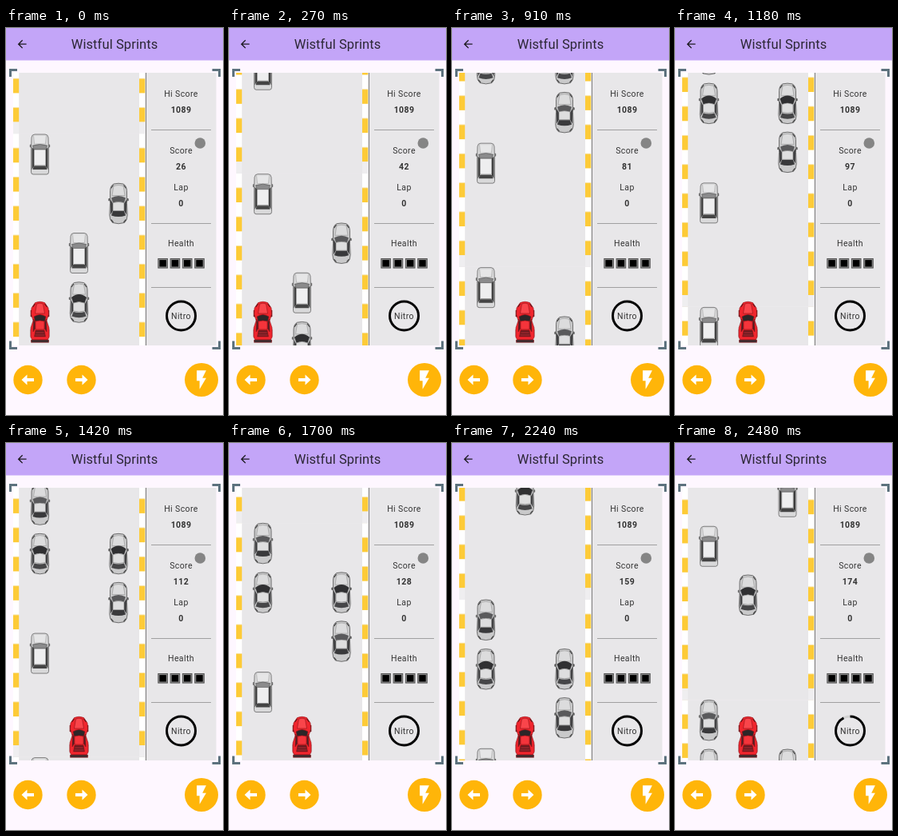
These frames come from a looping animation (272 by 484 pixels, 2510 ms). An HTML page:

```html
<!DOCTYPE html>
<html lang="en">
<head>
<meta charset="utf-8">
<title>Racing game</title>
<style>
  html, body { margin: 0; width: 100%; height: 100%; overflow: hidden; background: #fef7ff; }
  svg { display: block; width: 100vw; height: 100vh; }
  text { font: 10.5px Roboto, sans-serif; letter-spacing: .4px; text-anchor: middle; fill: #333; }
  .title { font-size: 16.5px; letter-spacing: .1px; fill: #2c2735; }
  .num { font-weight: 700; }
  .line { stroke: #a0a0a0; stroke-width: 1; }
  .corner { fill: none; stroke: #5d727e; stroke-width: 3; }
</style>
</head>
<body>
<svg viewBox="0 0 272 484" preserveAspectRatio="none">
  <defs>
    <clipPath id="view"><rect x="9" y="56" width="166" height="341"/></clipPath>
    <pattern id="kerb" width="7.2" height="36.3" patternUnits="userSpaceOnUse">
      <rect width="7.2" height="18.2" fill="#fff"/>
      <rect y="18.2" width="7.2" height="18.1" fill="#fdcb38"/>
    </pattern>

    <g id="tile">
      <rect x="9" width="166" height="341.2" fill="#e8e7e9"/>
      <g id="side">
        <rect width="7.2" height="326.7" fill="url(#kerb)" transform="translate(9)"/>
        <rect x="9" y="326.7" width="7.2" height="14.5" fill="#efeef0"/>
      </g>
      <use href="#side" x="158"/>
    </g>

    <g id="suv" stroke="#555" stroke-width=".7">
      <path d="M-11-12h-1.200v3h1.200M11-12h1.200v3H11" fill="#777"/>
      <path d="M-10.500-21q.5-4 4-4H6.500q3.500 0 4 4l.5 16V22q0 3-2.500 3H-8.500q-2.500 0-2.500-3V-5z" fill="#d9d9da"/>
      <path d="M-8-23-7-13H7L8-23" fill="#e6e6e7" stroke="#aaa"/>
      <path d="M-9-11Q0-14 9-11L7.500-6H-7.500z" fill="#8b8b8c"/>
      <path d="M-10-9-7.500-6V15l-2.500 4zM10-9 7.500-6V15l2.500 4z" fill="#3c3c3c" stroke="none"/>
      <rect x="-7.300" y="-6" width="14.600" height="20" rx="1" fill="#eeeeef" stroke="#666"/>
      <path d="M-7.500 14.500h15L9 19H-9z" fill="#444" stroke="none"/>
    </g>

    <g id="body" stroke="#555" stroke-width=".8">
      <path d="M-11-6h-1.200v2.500h1.200M11-6h1.200v2.500H11" fill="#666"/>
      <path d="M-6-24.500Q0-26 6-24.500q4 2 4.500 8.500L10.500 0l.7 14q0 7-3.700 10Q0 26.500-7.500 24q-3.700-3-3.700-10L-10.500 0v-16q.5-6.500 4.500-8.500z" fill="#c9c9ca"/>
      <path d="M-6-22Q0-24 6-22L8-10H-8z" fill="#dcdcdd" stroke="#999" stroke-width=".6"/>
      <path d="M-9.500-19l3-4M9.500-19l-3-4M-9.500 20l3 3.500M9.500 20l-3 3.500" stroke="#444" stroke-width="1.200"/>
    </g>
    <g id="coupe">
      <use href="#body"/>
      <path d="M-9.500-6Q0-14 9.500-6L7 1Q0-2-7 1z" fill="#303032"/>
      <path d="M-10-3-7.500 2v9l-2.500 5zM10-3 7.500 2v9l2.500 5z" fill="#414143"/>
      <path d="M-7 1Q0-2 7 1V11Q0 13-7 11z" fill="#dededf" stroke="#777" stroke-width=".6"/>
      <path d="M-7 12Q0 14 7 12L9 17.500Q0 21-9 17.500z" fill="#464648"/>
    </g>
    <g id="sedan">
      <use href="#body"/>
      <path d="M-9-7Q0-12 9-7L7-1Q0-3-7-1z" fill="#5a5a5c"/>
      <path d="M-10-5-7 0V9l-3 5zM10-5 7 0V9l3 5z" fill="#414143"/>
      <path d="M-7-1Q0-3 7-1V9H-7z" fill="#dededf" stroke="#777" stroke-width=".6"/>
      <path d="M-7 9.500H7l2 5.500Q0 18-9 15z" fill="#39393b"/>
    </g>

    <g id="racer" stroke="#8f1318" stroke-width=".6">
      <path d="M-11.500-15h3v8h-3zM8.500-15h3v8h-3zM-11.500 9h3v9h-3zM8.500 9h3v9h-3z" fill="#333"/>
      <path d="M-6-24.500Q0-27 6-24.500l4.500 6.500.5 8-2.500 8 3 9v12l-2 3H-9.500l-2-3V7l3-9-2.500-8 .5-8z" fill="#f0262e"/>
      <path d="M-4-23-6-11H6L4-23Q0-24.500-4-23z" fill="#f9454b"/>
      <path d="M-9-19l3-4M9-19l-3-4" stroke="#5b1518" stroke-width="1.200"/>
      <path d="M-7.500-7Q0-12 7.500-7L6-1Q0-3-6-1z" fill="#2c2628"/>
      <path d="M-8-4-6 0v8l-2.500 4zM8-4 6 0v8l2.500 4z" fill="#4a2024"/>
      <path d="M-5.500-1Q0-3 5.500-1V9H-5.500z" fill="#f5343b"/>
      <path d="M-5.500 10h11l1.500 8H-7z" fill="#6b1b20"/>
      <path d="M-5 13H5M-6 16H6" stroke="#e0383d"/>
      <path d="M-11 22h22v3.200h-22z" fill="#3a2f31"/>
    </g>

    <g id="button">
      <circle r="18.200" fill="#ffb509"/>
      <path fill="#fff" d="M-8 0-1-6.500V-2H7.500V2H-1V6.500z"/>
    </g>
  </defs>

  <rect width="272" height="484" fill="#fef7ff"/>
  <rect width="272" height="40.500" fill="#c3a5f8"/>
  <path d="M20 11H7.830l5.590-5.590L12 4l-8 8 8 8 1.410-1.410L7.830 13H20z" transform="translate(12 12) scale(.68)" fill="#1d1b20"/>
  <text class="title" x="136" y="26">Wistful Sprints</text>

  <path class="corner" d="M5.500 61V52.500H14M258.500 52.500H267.500V61M5.500 391.500V400.500H14M258.500 400.500H267.500V391.500"/>

  <g clip-path="url(#view)">
    <g id="road"><use href="#tile"/><use href="#tile" y="-341"/></g>
    <g id="cars"></g>
    <use id="player" href="#racer"/>
  </g>

  <rect x="175" y="56" width="88.500" height="341" fill="#e8e7e9"/>
  <path d="M175.500 56V397" stroke="#808080"/>
  <path class="line" d="M182 127.500H257M182 244.500H257M182 324.500H257"/>
  <text x="219.500" y="86">Hi Score</text>
  <text class="num" x="219.500" y="106">1089</text>
  <text x="219.500" y="157">Score</text>
  <text class="num" x="219.500" y="177" id="score">26</text>
  <text x="219.500" y="203">Lap</text>
  <text class="num" x="219.500" y="223">0</text>
  <text x="219.500" y="273">Health</text>
  <g id="health"></g>
  <circle cx="243.300" cy="144" r="6.800" fill="#858585"/>

  <circle cx="219.500" cy="360" r="18" fill="none" stroke="#d2d2d2" stroke-width="3"/>
  <circle id="gauge" cx="219.500" cy="360" r="18" fill="none" stroke="#050505" stroke-width="3"
    pathLength="100" transform="rotate(-90 219.500 360)"/>
  <text x="219.500" y="364">Nitro</text>

  <use href="#button" transform="translate(27.500 440)"/>
  <use href="#button" transform="translate(94.500 440) scale(-1 1)"/>
  <circle cx="245" cy="440" r="21" fill="#ffb509"/>
  <path fill="#fff" d="M7 2v11h3v9l7-12h-4l4-8z" transform="translate(245 440) scale(1.180) translate(-12 -12)"/>
</svg>

<script>
  const LOOP = 2510, STEP = 30.24;
  const SPEED = 3.03, BOOST_AT = 134.5, BOOST = 6.06;
  const LANES = [42.5, 91.5, 141];
  const ROAD_TOP = 56, ROAD_H = 341, SEAM = 132;

  // [step, game ticks]
  const CLOCK = [[0, 0], [17, 31], [30, 55], [47, 86], [56, 102], [67, 121], [82, 148], [83, 150]];

  // [kind, lane, centre at the start]
  const TRAFFIC = [
    ['coupe', 1, 343], ['suv', 1, 281.5], ['sedan', 2, 219.5], ['suv', 0, 158],
    ['suv', 0, 2.5], ['sedan', 2, -61], ['coupe', 0, -122], ['coupe', 2, -122],
    ['sedan', 0, -183.5], ['coupe', 1, -340], ['suv', 0, -401], ['suv', 2, -463]
  ];

  const $ = id => document.getElementById(id);
  const add = (parent, tag, attrs) => {
    const el = document.createElementNS('http://www.w3.org/2000/svg', tag);
    for (const key in attrs) el.setAttribute(key, attrs[key]);
    return parent.appendChild(el);
  };
  const move = (el, x, y) => el.setAttribute('transform', `translate(${x} ${y})`);

  const cars = TRAFFIC.map(([kind, lane, y]) => ({
    el: add($('cars'), 'use', { href: '#' + kind }), x: LANES[lane], y
  }));

  for (let i = 0; i < 4; i++) {
    const x = 190.8 + i * 15.3;
    add($('health'), 'rect', { x, y: 288.5, width: 11.6, height: 11.6, fill: '#8a8a8a', stroke: '#555' });
    add($('health'), 'rect', { x: x + 1.6, y: 290.1, width: 8.4, height: 8.4, fill: '#000' });
  }

  function ticksAt(step) {
    const i = Math.max(1, CLOCK.findIndex(p => p[0] >= step));
    const [a, from] = CLOCK[i - 1], [b, to] = CLOCK[i];
    return from + (to - from) * (step - a) / (b - a);
  }

  function draw(time) {
    const step = Math.min(82, Math.floor(time / STEP + .1));
    const ticks = ticksAt(step);
    const boost = Math.max(0, ticks - BOOST_AT);
    const scroll = ticks * SPEED + boost * BOOST;

    move($('road'), 0, ROAD_TOP + (SEAM - ROAD_TOP + scroll) % ROAD_H);
    for (const { el, x, y } of cars) move(el, x, y + scroll);
    move($('player'), LANES[step < 28 ? 0 : 1], 368);
    $('score').textContent = 26 + Math.floor(ticks + 1e-6);
    $('gauge').setAttribute('stroke-dasharray', boost ? `${100 - boost * .55} 100` : 'none');
  }

  function frame() {
    draw(performance.now() % LOOP);
    requestAnimationFrame(frame);
  }
  frame();
</script>
</body>
</html>
```
